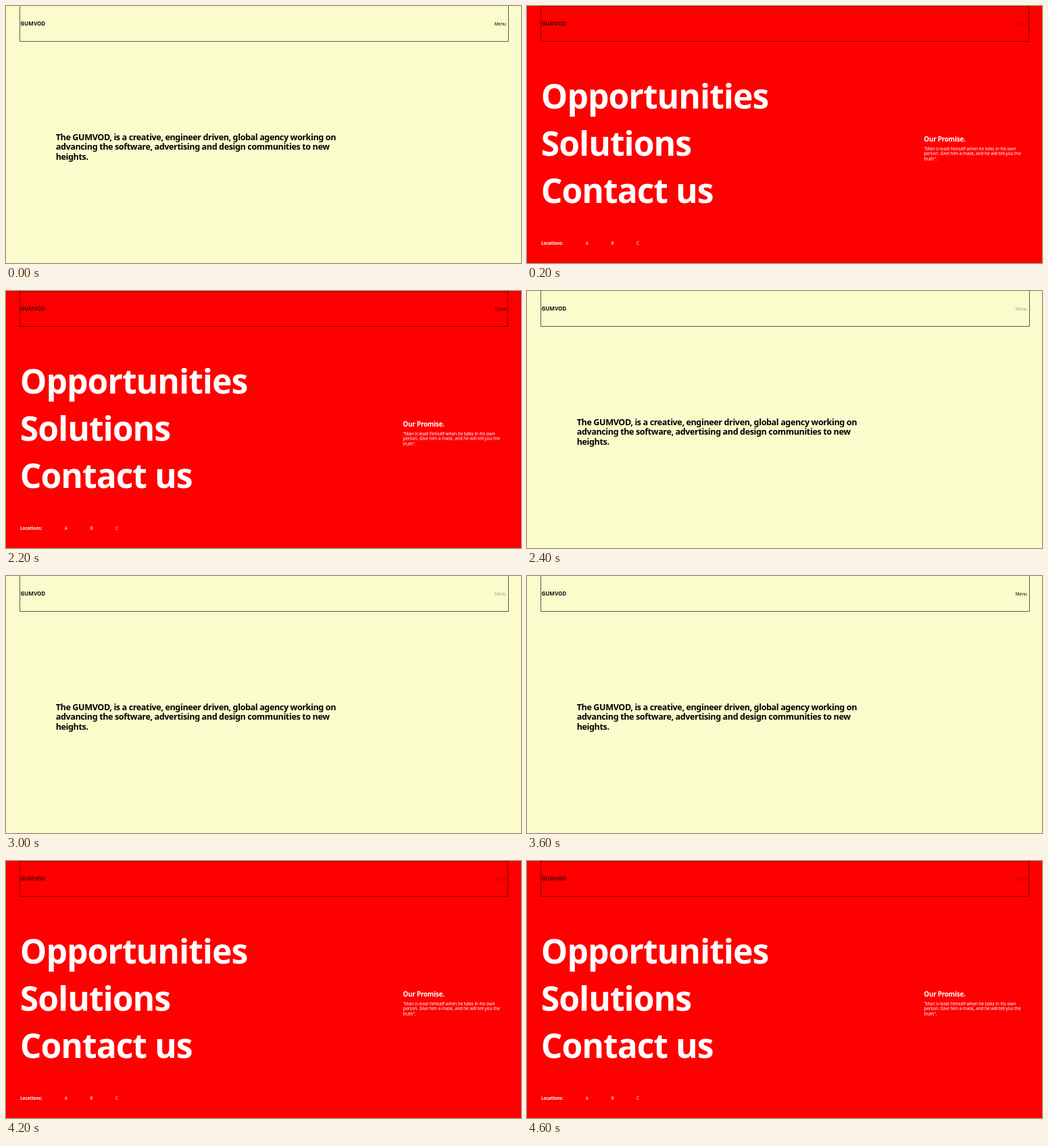
Write an HTML page that moves like this. It is 762 px wide and 381 px high and loops after 4.8 s.

```html
<!DOCTYPE html>
<html lang="en">
<head>
<meta charset="utf-8">
<title>Agency menu</title>
<style>
html, body { margin: 0; width: 100%; height: 100%; overflow: hidden; }
svg { display: block; width: 100%; height: 100%; }
text { font-family: "Noto Sans", "Open Sans", sans-serif; white-space: pre; }
.bold { font-weight: 700; }
.tight { letter-spacing: -.02em; }
.intro { font-size: 12.55px; letter-spacing: -.03em; }
.link { font-size: 49.8px; }
.head { font-size: 9.8px; }
.quote { font-size: 6.65px; }
.small { font-size: 6.4px; }
.logo { font-size: 8px; }
.toggle { font: 6.8px "Liberation Sans", Arial, sans-serif; }
</style>
</head>
<body>
<svg viewBox="0 0 762 381" preserveAspectRatio="none">
  <rect id="bg" width="762" height="381"/>
  <path id="edge" fill="none" stroke="#a00" d="M21 .5H742"/>
  <path id="frame" fill="none"/>
  <text id="logo" class="logo bold" x="21.5" y="29">GUMVOD</text>
  <text id="toggle" class="toggle" x="722.7" y="28.7"></text>
  <g id="home"></g>
  <g id="menu" fill="#fff"></g>
</svg>
<script>
const LOOP = 4800, STEP = 200;
const $ = id => document.getElementById(id);
const [bg, edge, frame, logo, toggle, home, menu] =
  ["bg", "edge", "frame", "logo", "toggle", "home", "menu"].map($);

function addLines(parent, cls, x, y, lead, lines) {
  lines.forEach((line, i) => {
    const el = document.createElementNS("http://www.w3.org/2000/svg", "text");
    el.setAttribute("class", cls);
    el.setAttribute("x", x);
    el.setAttribute("y", y + i * lead);
    el.textContent = line;
    parent.append(el);
  });
}

addLines(home, "intro bold", 73.7, 198.7, 14.6, [
  "The GUMVOD, is a creative, engineer driven, global agency working on",
  "advancing the software, advertising and design communities to new",
  "heights."
]);
addLines(menu, "link bold tight", 20.8, 151.5, 70.2, ["Opportunities", "Solutions", "Contact us"]);
addLines(menu, "head bold tight", 587.3, 201, 0, ["Our Promise."]);
addLines(menu, "quote tight", 587.2, 213.7, 7.5, [
  "\"Man is least himself when he talks in his own",
  "person. Give him a mask, and he will tell you the",
  "truth\"."
]);
addLines(menu, "small bold", 21, 354.3, 0, ["Locations:"]);
["A", "B", "C"].forEach((name, i) =>
  addLines(menu, "small", 86.8 + i * 37.6, 354.3, 0, [name]));

const themes = {
  home: { bg: "#fafccb", line: "#5c5c4e", logo: "#111", text: "#111", label: "Menu", right: 743.5 },
  menu: { bg: "#f00", line: "#700", logo: "#500505", text: "#300000", label: "Close", right: 742.5 }
};

// The toggle is dimmed while hovered, right after each click.
function toggleOpacity(t) {
  if (t < 200) return 1;
  if (t < 1400) return .36;
  if (t < 2400) return 1;
  if (t < 3800) return Math.min(1, .36 + .64 * Math.max(0, t - 3000) / 600);
  return .36;
}

function render(ms) {
  const t = Math.floor(ms % LOOP / STEP) * STEP;
  const open = (t >= 200 && t < 2400) || t >= 3800;
  const theme = open ? themes.menu : themes.home;
  bg.setAttribute("fill", theme.bg);
  frame.setAttribute("d", `M20.5 0V52.5H${theme.right}V0`);
  frame.setAttribute("stroke", theme.line);
  logo.setAttribute("fill", theme.logo);
  toggle.setAttribute("fill", theme.text);
  toggle.setAttribute("opacity", toggleOpacity(t));
  toggle.textContent = theme.label;
  home.style.display = open ? "none" : "";
  menu.style.display = edge.style.display = open ? "" : "none";
}

const start = performance.now();
function tick() {
  render(performance.now() - start);
  requestAnimationFrame(tick);
}
tick();
</script>
</body>
</html>
```
